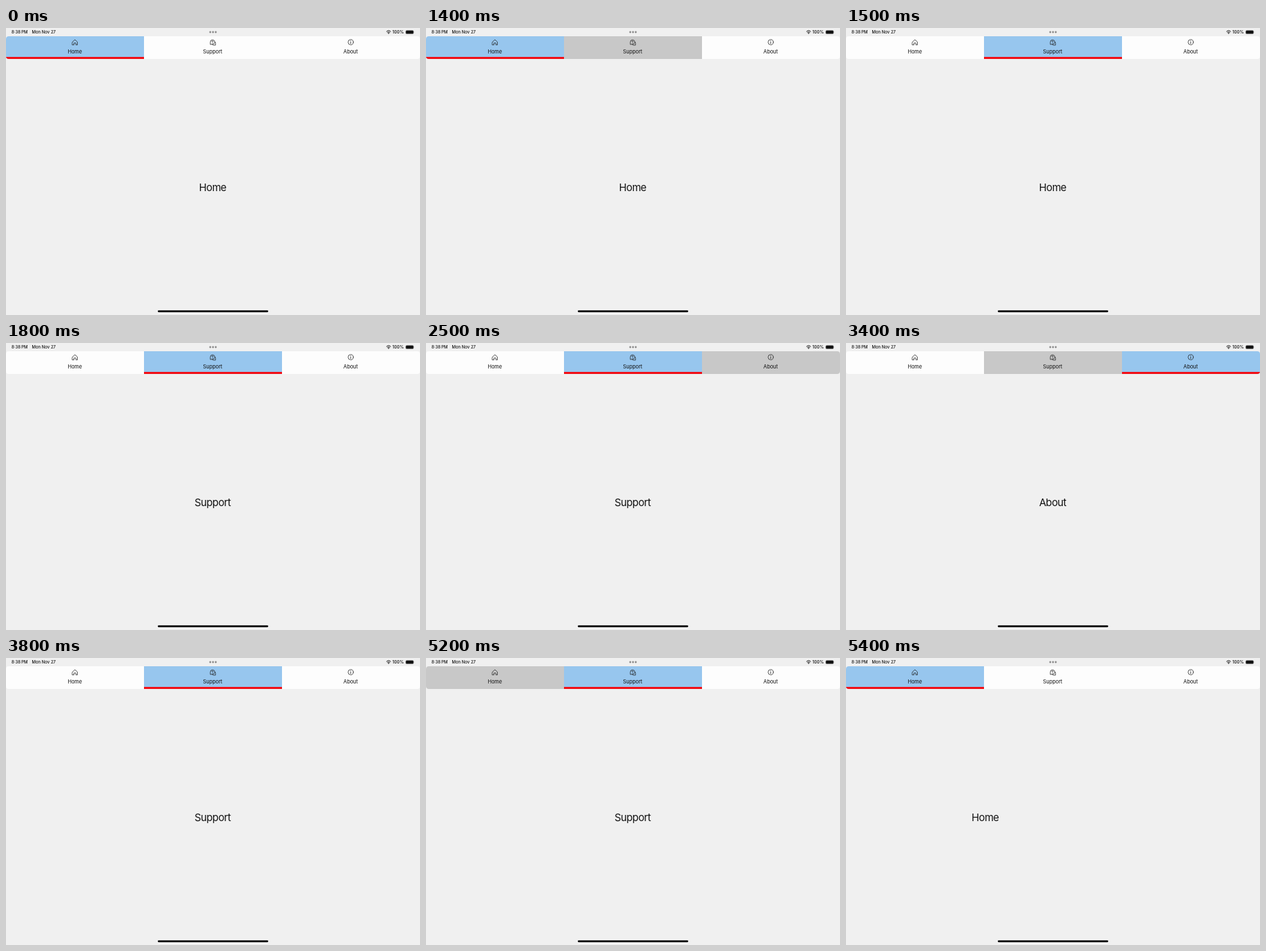
Write an HTML page that moves like this. It is 600 by 417 pixels and loops after 5.5 s.

```html
<!DOCTYPE html>
<html lang="en">
<head>
<meta charset="utf-8">
<title>Tab navigation</title>
<style>
html, body { margin: 0; width: 100%; height: 100%; overflow: hidden; background: #f0f0f0; }
svg { display: block; width: 100%; height: 100%; }
text { font-family: Inter, Roboto, sans-serif; fill: #111; }
.status { font-size: 6px; font-weight: 500; }
.label { font-size: 7.4px; text-anchor: middle; }
.page { font-size: 14.8px; letter-spacing: -.5px; text-anchor: middle; }
.icon { fill: none; stroke: #222; stroke-width: .75; stroke-linejoin: round; stroke-linecap: round; }
</style>
</head>
<body>
<svg viewBox="0 0 600 417">
  <clipPath id="bar"><rect y="12" width="600" height="33" rx="4"/></clipPath>
  <rect width="600" height="417" fill="#f0f0f0"/>

  <g class="status">
    <text x="8" y="8.2">8:38&#8201;PM</text>
    <text x="37.5" y="8.2">Mon Nov 27</text>
    <text x="560" y="8.2" font-size="6.2">100%</text>
  </g>
  <g fill="#8c8c8c">
    <circle cx="296" cy="6" r="1.4"/><circle cx="300" cy="6" r="1.4"/><circle cx="304" cy="6" r="1.4"/>
  </g>
  <g fill="none" stroke="#111" stroke-width="1">
    <path d="M551.3 5.3Q554.5 2.3 557.7 5.3M552.6 6.7Q554.5 5 556.4 6.7"/>
    <path d="M553.4 7.5L554.5 8.7L555.6 7.5Q554.5 6.7 553.4 7.5Z" fill="#111" stroke="none"/>
  </g>
  <rect x="579.3" y="3.4" width="11.4" height="5.2" rx="1.6" fill="#111" stroke="#999" stroke-width=".4"/>
  <path d="M591.4 5.2Q592.4 6 591.4 6.8Z" fill="#999"/>

  <g clip-path="url(#bar)">
    <rect y="12" width="600" height="33" fill="#fdfdfd"/>
    <rect id="press" y="12" width="200" height="33" fill="#c8c8c8"/>
    <g id="active">
      <rect y="12" width="200" height="33" fill="#97c6ee"/>
      <rect y="42" width="200" height="3" fill="#f01018"/>
    </g>
  </g>

  <g class="icon">
    <path d="M96.3 20.3L99.9 17L103.5 20.3V24.5H101.3V21.8H98.5V24.5H96.3Z"/>
    <path d="M296.1 23.6V20.4A3.2 3.2 0 1 1 299.3 23.6Z"/>
    <path d="M298.3 19.5Q298.4 18.6 299.3 18.6T300.2 19.6Q300.1 20.2 299.3 20.8M299.3 22.1V22.2"/>
    <path d="M303 20.2Q303.7 21 303.7 22.2V24.9H301Q299.6 24.9 298.9 24.2"/>
    <circle cx="499.6" cy="20.6" r="3.8"/>
    <path d="M499.6 20.2V22.6M499.6 18.7V18.8"/>
  </g>
  <text class="label" x="99.8" y="37">Home</text>
  <text class="label" x="299.5" y="37">Support</text>
  <text class="label" x="499.5" y="37">About</text>

  <text class="page" id="next" y="236.5"></text>
  <text class="page" id="prev" y="236.5"></text>
  <rect x="220" y="410.2" width="160" height="2.8" rx="1.4" fill="#000"/>
</svg>
<script>
const LOOP = 5500, STEP = 100, WIDTH = 600, CENTER = 299.5;
const names = ['Home', 'Support', 'About'];
// Times in ms: touch down, tab switch, then the slide of the page.
const moves = [
  { from: 0, to: 1, press: 1400, change: 1500, start: 1530, length: 270 },
  { from: 1, to: 2, press: 2500, change: 2600, start: 2630, length: 270 },
  { from: 2, to: 1, press: 3400, change: 3600, start: 3600, length: 200 },
  { from: 1, to: 0, press: 5200, change: 5300, start: 5293, length: 200 }
];
const [press, active, next, prev] =
  ['press', 'active', 'next', 'prev'].map(id => document.getElementById(id));

function place(label, tab, x, visible = true) {
  label.textContent = names[tab];
  label.setAttribute('x', x);
  label.style.display = visible ? '' : 'none';
}

function draw(now) {
  const t = Math.floor(now % LOOP / STEP) * STEP;
  const move = moves.findLast(m => t >= m.press);
  const pressed = move && t < move.change;
  const tab = !move ? 0 : pressed ? move.from : move.to;

  press.style.display = pressed ? '' : 'none';
  if (pressed) press.setAttribute('x', move.to * 200);
  active.setAttribute('transform', `translate(${tab * 200})`);

  if (!move || pressed) {
    place(next, tab, CENTER);
    prev.style.display = 'none';
  } else {
    const u = Math.min(1, Math.max(0, (t - move.start) / move.length));
    const rest = WIDTH * (1 - u) ** 2.37;
    const forward = move.to > move.from;
    place(next, move.to, CENTER + (forward ? rest : -rest));
    // Only forward moves keep the old page on screen while it leaves.
    place(prev, move.from, CENTER + rest - WIDTH, forward && u < 1);
  }
}

const begin = performance.now();
function tick() {
  draw(performance.now() - begin);
  requestAnimationFrame(tick);
}
tick();
</script>
</body>
</html>
```
